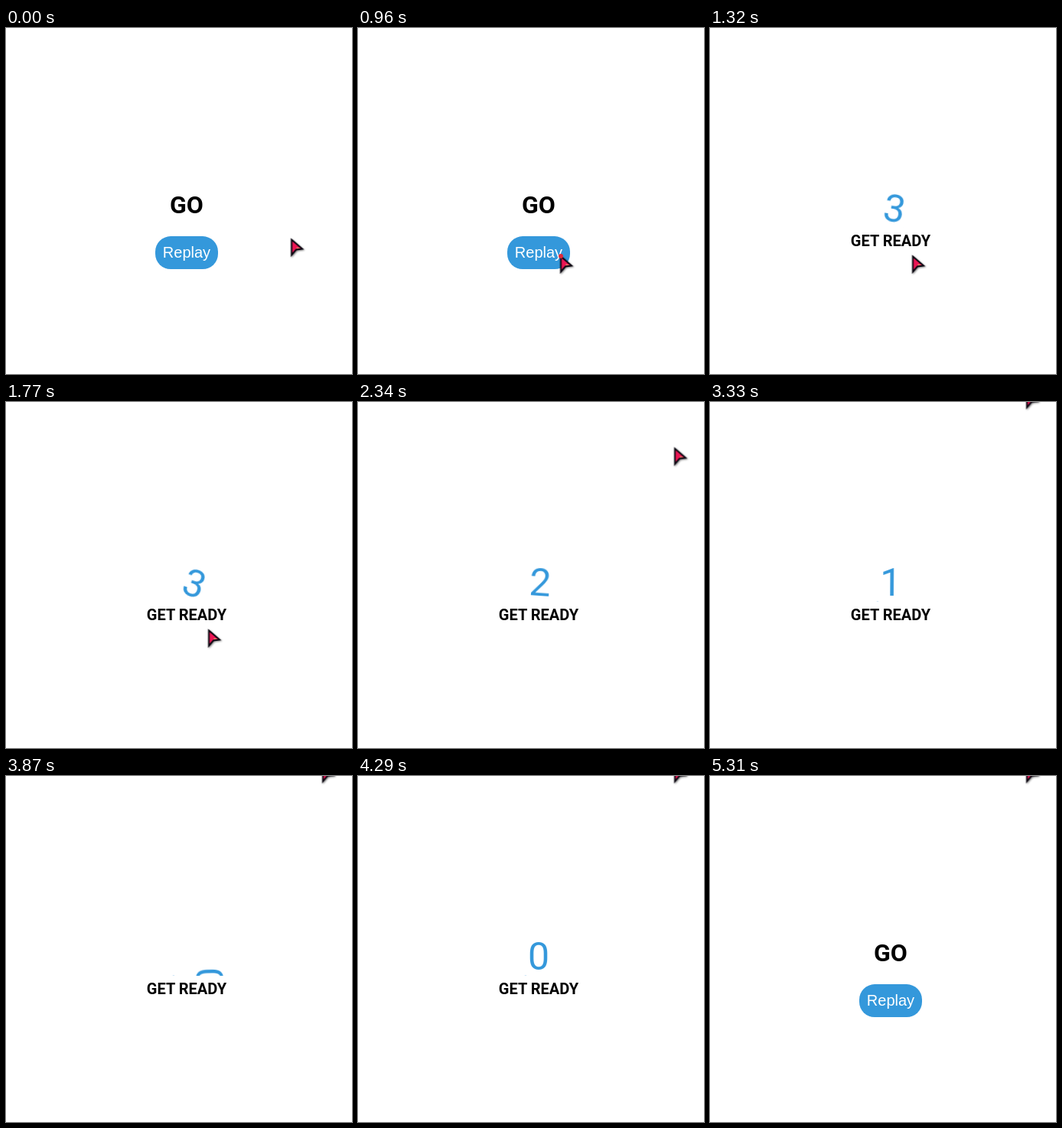
An HTML page for the animation above (5.4 s loop, 452 by 452 pixels).

```html
<!DOCTYPE html>
<html lang="en">
<head>
<meta charset="utf-8">
<title>Countdown</title>
<style>
  html, body { margin: 0; width: 100%; height: 100%; overflow: hidden; background: #fff; }
  body { position: relative; color: #000; font-family: Roboto, sans-serif; }
  .counter, .final {
    position: absolute; left: 236px; top: 253.3px;
    translate: -50% -50%; text-align: center;
  }
  .nums {
    position: relative; width: 250px; height: 50px; overflow: hidden;
    color: #3498db; font-size: 50px;
  }
  .nums span {
    position: absolute; left: 50%; top: 50%; translate: -50% -50%;
    transform-origin: bottom center; transform: rotate(120deg);
  }
  h4 { margin: 5px; font-size: 20px; }
  h1 { margin: 21.4px 0; font-size: 32px; }
  .replay {
    width: 82px; height: 43px; margin: 0 auto; border-radius: 20px;
    background: #3498db; color: #fff;
    font: 20px/43px "Liberation Sans", Arial, sans-serif;
  }
  svg, .dot { position: absolute; left: 0; top: 0; }
  svg { overflow: visible; filter: drop-shadow(1px 1px 1px rgba(0, 0, 0, .5)); }
  .dot { left: 262px; top: 295px; width: 6px; height: 6px; border-radius: 50%; background: #e0283a; }
</style>
</head>
<body>
<div class="counter">
  <div class="nums"><span>3</span><span>2</span><span>1</span><span>0</span></div>
  <h4>GET READY</h4>
</div>
<div class="final">
  <h1>GO</h1>
  <div class="replay">Replay</div>
</div>
<svg class="cursor" width="20" height="27">
  <path d="M1.5 2.5V22.5L7.5 15.5 15.5 14.5Z" fill="#ec1554"/>
  <path d="M8 12.5L12.5 13.4 8 14.4Z" fill="#d9a066"/>
  <path d="M1.5 2.5V22.5L7.5 15.5 15.5 14.5Z" fill="none" stroke="#0c0812" stroke-width="2"/>
</svg>
<div class="dot"></div>
<script>
const LOOP = 5400, START = 1023, PHASE = 467, POP = 187;
const END = START + 7 * PHASE;
const $ = s => document.querySelector(s);

// rows: [ms, value, easing to the next row]
function run(el, prop, rows) {
  const all = [[0, rows[0][1]], ...rows, [LOOP, rows[rows.length - 1][1]]];
  const keys = all.map(([ms, value, easing = 'linear']) =>
    ({ offset: ms / LOOP, [prop]: value, easing }));
  el.animate(keys, { duration: LOOP, iterations: Infinity });
}

const turn = a => `rotate(${a}deg)`;
const scale = s => `scale(${s})`;
const at = (x, y) => `translate(${x}px, ${y}px)`;
const soft = 'ease-in-out', out = 'ease-out';

document.querySelectorAll('.nums span').forEach((el, i) => {
  const t = START + i * 2 * PHASE, o = t + PHASE;
  const rows = [
    [t, turn(120), soft],
    [t + .3 * PHASE, turn(-20), soft],
    [t + .6 * PHASE, turn(10), soft],
    [o, turn(0), soft]
  ];
  if (i < 3) rows.push([o + .6 * PHASE, turn(20), soft], [o + PHASE, turn(-120)]);
  run(el, 'transform', rows);
});

run($('.counter'), 'transform', [
  [START, scale(0)], [START, scale(1)],
  [END, scale(1), out], [END + POP, scale(0)]
]);

run($('.final'), 'transform', [
  [START, scale(1)], [START, scale(0)],
  [END, scale(0), out], [END + .3 * POP, scale(1.4), out], [END + POP, scale(1)]
]);

run($('.cursor'), 'transform', [
  [10, at(373.5, 273)], [150, at(332, 295)],
  [270, at(277, 310), out], [385, at(263.5, 296)],
  [1780, at(263.5, 296), 'ease-in'], [1930, at(350, 225)],
  [2070, at(418, 148), out], [2310, at(412.5, 58.5)],
  [2700, at(412.5, 58.5), soft], [2940, at(412.5, -15.5)]
]);

run($('.dot'), 'opacity', [[955, 0], [955, 1], [START, 1], [START, 0]]);
</script>
</body>
</html>
```
